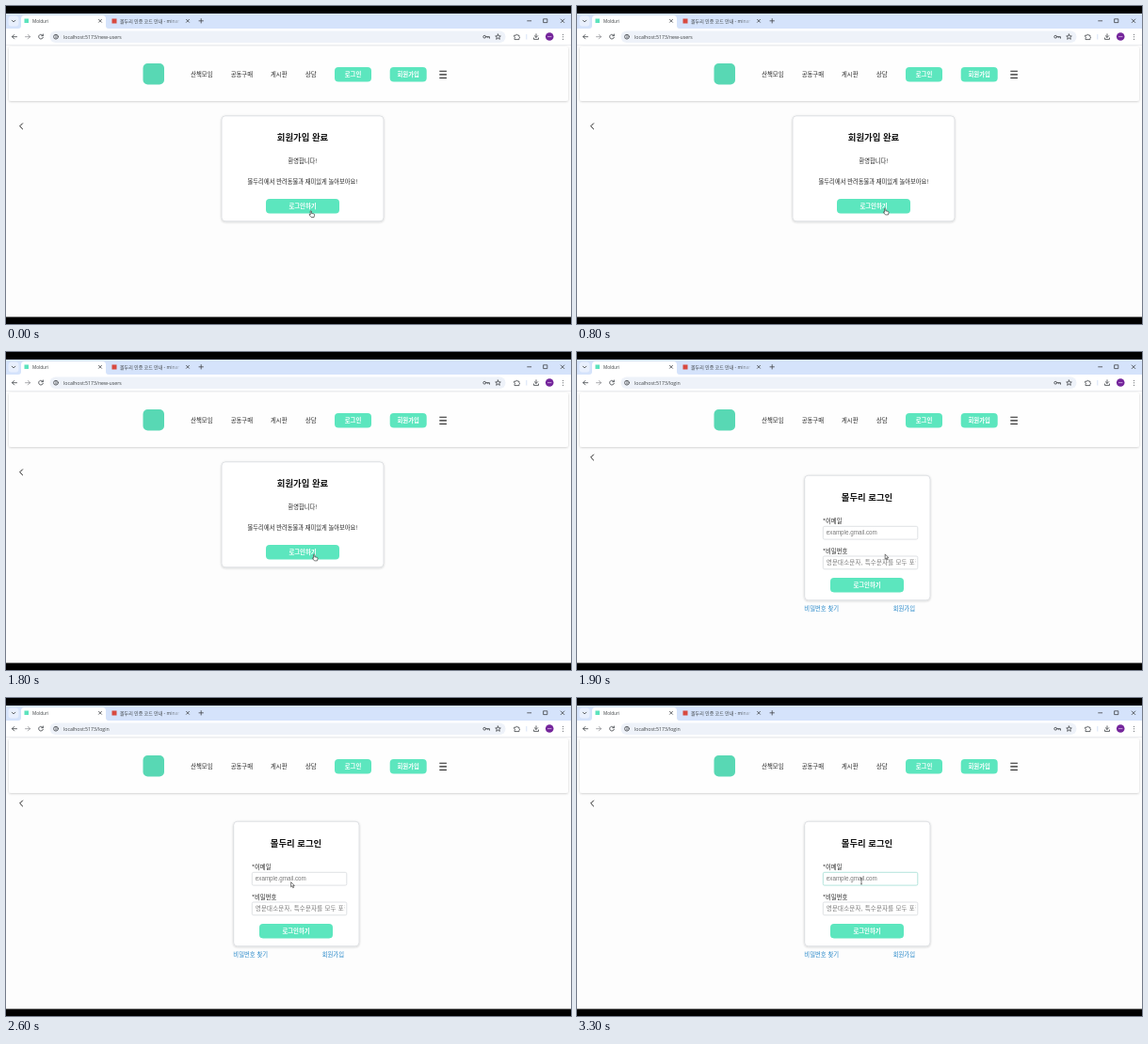
Write an HTML page that moves like this. It is 600x338 px and loops after 3400 ms.

```html
<!DOCTYPE html>
<html lang="ko">
<head>
<meta charset="utf-8">
<title>Molduri</title>
<style>
html, body { margin: 0; width: 100%; height: 100%; overflow: hidden; background: #000; }
svg { display: block; width: 100%; height: 100%; }
text { font-family: "Noto Sans CJK KR", "Noto Sans CJK JP", "Noto Sans CJK", sans-serif; font-size: 6.35px; fill: #222; white-space: pre; }
.ui { font-family: "Open Sans", "Noto Sans", "Noto Sans CJK KR", sans-serif; font-size: 5.2px; fill: #3c4043; }
.mid { text-anchor: middle; }
.med { font-weight: 500; }
.title { font-size: 9.4px; font-weight: 700; fill: #111; text-anchor: middle; }
.btn { font-weight: 700; fill: #fff; text-anchor: middle; }
.hint { font-family: "Liberation Sans", "Noto Sans CJK KR", sans-serif; font-size: 6.27px; fill: #777; }
.link { fill: #2587c8; }
.icon { fill: none; stroke: #474b50; stroke-width: .85; stroke-linecap: round; stroke-linejoin: round; }
.box { fill: #fff; stroke: #d2d5d8; stroke-width: .7; }
</style>
</head>
<body>
<svg viewBox="0 0 600 338">
  <defs>
    <filter id="soft" x="-10%" y="-10%" width="120%" height="125%">
      <feDropShadow dx="0" dy=".7" stdDeviation="1.1" flood-color="#000" flood-opacity=".2"/>
    </filter>
    <linearGradient id="fade">
      <stop offset="0" stop-color="#d5e3fb" stop-opacity="0"/>
      <stop offset="1" stop-color="#d5e3fb"/>
    </linearGradient>
    <clipPath id="field"><path d="M262 217h97.5v14h-97.5z"/></clipPath>
  </defs>
  <path d="M0 0h600v338H0z"/>
  <path d="M0 41h600v289.5H0z" fill="#fdfdfd"/>

  <g id="tabs">
    <path d="M0 8h600v18H0z" fill="#d5e3fb"/>
    <rect x="2.5" y="10.5" width="11" height="11" rx="3.5" fill="#e9f0fd"/>
    <path class="icon" d="M6.3 15.2l1.8 1.8 1.8-1.8"/>
    <path d="M13 24q3-.2 3-3v-7.500q0-3.500 3.500-3.500h83q3.500 0 3.500 3.500v7.500q0 2.800 3 3z" fill="#fff"/>
    <rect x="19.500" y="13.500" width="4.500" height="4.500" fill="#5ce3bd"/>
    <text class="ui" x="28" y="18" style="font-size:4.700px">Molduri</text>
    <path class="icon" d="M98.500 14.300l3 3m0-3l-3 3M191.500 14.300l3 3m0-3l-3 3M205 15.800h4.400m-2.200-2.200v4.400"/>
    <rect x="112.500" y="13.500" width="5" height="5" fill="#d84a40"/>
    <text class="ui" x="121" y="18" style="font-size:5px">몰두리 인증 코드 안내 - minar</text>
    <path d="M173 11h14v11h-14z" fill="url(#fade)"/>
    <path d="M187 11h3v11h-3z" fill="#d5e3fb"/>
    <path class="icon" d="M553.700 15.800h4m13.300-2h3.800v3.800H571zM589.200 14l3.600 3.600m0-3.600l-3.600 3.600"/>
  </g>

  <g id="toolbar">
    <path d="M0 24h600v17.500H0z" fill="#fff"/>
    <path d="M0 41.500h600" stroke="#e2e5ea" stroke-width=".6"/>
    <rect x="46.500" y="26.500" width="484" height="12.500" rx="6.250" fill="#eef2f9"/>
    <path class="icon" d="M11.500 32.700h-5m2.200-2.200l-2.200 2.200 2.200 2.200"/>
    <path class="icon" stroke-opacity=".55" d="M20.500 32.700h5m-2.200-2.200l2.200 2.200-2.200 2.200"/>
    <path class="icon" d="M39.200 31.500a2.400 2.400 0 1 0 .2 1.800M39.400 30v1.700h-1.700"/>
    <circle class="icon" cx="53" cy="32.700" r="2.400"/>
    <path class="icon" d="M53 32.600v1.200m0-2.300v.1"/>
    <text class="ui" id="url" x="61" y="34.700"></text>
    <path class="icon" d="M509.500 32.700h4v1.500m-1.700-1.500v1"/>
    <circle class="icon" cx="508.200" cy="32.700" r="1.400"/>
    <path class="icon" d="M522.500 30l.8 1.800 2 .2-1.500 1.300.5 2-1.800-1.100-1.800 1.100.5-2-1.500-1.300 2-.2z"/>
    <path class="icon" d="M540 31.200h1.600a.9.900 0 0 1 1.800 0h1.500v1.400a.9.900 0 0 1 0 1.700v1.300H540v-1.400a.8.800 0 0 0 0-1.500z"/>
    <path d="M552.800 30v5.500" stroke="#c6d7f4" stroke-width=".7"/>
    <path class="icon" d="M563 29.800v3.600m-1.700-1.700l1.700 1.700 1.700-1.700m-4.200 2.300v1.400h5v-1.400"/>
    <circle cx="577.200" cy="32.500" r="4.300" fill="#74259b"/>
    <path d="M575 32.600h4.400" stroke="#d9b7e6" stroke-width=".8"/>
    <path d="M591.500 30.200v.01m0 2.490v.01m0 2.490v.01" stroke="#474b50" stroke-width="1.100" stroke-linecap="round"/>
  </g>

  <g id="nav">
    <rect x="3" y="43" width="594" height="58" rx="2.500" fill="#fefefe" filter="url(#soft)"/>
    <rect x="145.500" y="61" width="22.500" height="22.500" rx="5" fill="#58d8b4"/>
    <path d="M460.300 69.300h7.600m-7.600 3.600h7.600m-7.600 3.600h7.600" stroke="#222" stroke-width="1.100"/>
  </g>
  <path class="icon" id="back" d="M17.600 -3l-3 3 3 3" style="stroke:#222;stroke-width:1"/>

  <g id="done">
    <rect class="box" x="229" y="116.800" width="172" height="112" rx="4" filter="url(#soft)"/>
    <text class="title" x="315" y="143.300">회원가입 완료</text>
    <text class="mid med" x="315" y="167.400" style="font-size:6.250px">환영합니다!</text>
    <text class="mid med" x="315" y="189" style="font-size:6.280px">몰두리에서 반려동물과 재미있게 놀아보아요!</text>
  </g>

  <g id="login">
    <rect class="box" x="241.700" y="131.200" width="133.300" height="132.600" rx="4" filter="url(#soft)"/>
    <text class="title" x="308" y="157.900">몰두리 로그인</text>
    <text class="med" x="261" y="182.200">*이메일</text>
    <rect class="box" id="email" x="261.300" y="185.300" width="100.500" height="13.800" rx="1.500"/>
    <text class="hint" x="264.800" y="194.300">example.gmail.com</text>
    <path id="caret" d="M264.700 189v6.800" stroke="#222" stroke-width=".6"/>
    <text class="med" x="261" y="214">*비밀번호</text>
    <rect class="box" x="261.300" y="217" width="100.500" height="13.800" rx="1.500"/>
    <text class="hint" x="264.800" y="226.100" letter-spacing=".22" style="font-size:6.450px" clip-path="url(#field)">영문대소문자, 특수문자를 모두 포함</text>
    <text class="link" x="241.300" y="275">비밀번호 찾기</text>
    <text class="link" x="335.700" y="275">회원가입</text>
  </g>

  <g id="pointer" stroke="#333" stroke-width=".65" stroke-linejoin="round" fill="#fff">
    <path id="hand" d="M-.6 .5q.6-1 1.200 0v2.400l2.500.5q.9.300.7 1.200l-.5 2.400h-3l-2-2.400q-.3-.9.600-.6l.5.500z"/>
    <path id="arrow" d="M0 0v5.200l1.200-1.100.9 2 .9-.4-.9-1.900h1.600z"/>
    <path id="beam" fill="none" d="M-1 -3.200q.9 0 1 .6.100-.6 1-.6M0 -2.600v5.200M-1 3.200q.9 0 1-.6.100.6 1 .6"/>
  </g>
</svg>
<script>
const LOOP = 3400, STEP = 100;
const SWITCH = 1900, FOCUS = 2700, BLINK = 500;
const $ = id => document.getElementById(id);

function add(parent, tag, attrs, text = "") {
  const el = document.createElementNS("http://www.w3.org/2000/svg", tag);
  for (const key in attrs) el.setAttribute(key, attrs[key]);
  el.textContent = text;
  $(parent).append(el);
}

function button(parent, x, y, width, height, label) {
  add(parent, "rect", { x, y, width, height, rx: 4, fill: "#5ce6be" });
  add(parent, "text", { x: x + width / 2, y: y + height / 2 + 2.3, class: "btn" }, label);
}

[["산책모임", 196.2], ["공동구매", 238.7], ["게시판", 281], ["상담", 318]]
  .forEach(([label, x]) => add("nav", "text", { x, y: 75.3 }, label));
button("nav", 349, 65, 39, 15.5, "로그인");
button("nav", 407.7, 65, 39, 15.5, "회원가입");
button("done", 276, 205, 78, 15.4, "로그인하기");
button("login", 269, 240, 78, 15.4, "로그인하기");

// Pointer stops: time, x, y
const stops = [
  [0, 323.800, 217.500], [300, 323.800, 217.500], [700, 327.200, 214.900],
  [1900, 327.200, 214.900], [2300, 306, 200.300], [2700, 302, 194.800], [LOOP, 302, 194.800]
];

function pointerAt(t) {
  const i = stops.findIndex(s => s[0] > t);
  const [t0, x0, y0] = stops[i - 1], [t1, x1, y1] = stops[i];
  const u = (t - t0) / (t1 - t0), k = u * u * (3 - 2 * u);
  return [x0 + (x1 - x0) * k, y0 + (y1 - y0) * k];
}

const show = (id, on) => $(id).style.display = on ? "" : "none";

function draw(now) {
  const t = Math.floor((now % LOOP) / STEP) * STEP;
  const login = t >= SWITCH, focus = t >= FOCUS;
  show("done", !login);
  show("login", login);
  show("hand", !login);
  show("arrow", login && !focus);
  show("beam", focus);
  show("caret", focus && t < FOCUS + BLINK);
  $("url").textContent = "localhost:5173/" + (login ? "login" : "new-users");
  $("back").setAttribute("transform", `translate(0 ${login ? 112 : 127.8})`);
  $("email").style.stroke = focus ? "#94d8cd" : "";
  $("pointer").setAttribute("transform", `translate(${pointerAt(t)})`);
}

const start = performance.now();
function tick() {
  draw(performance.now() - start);
  requestAnimationFrame(tick);
}
tick();
</script>
</body>
</html>
```
